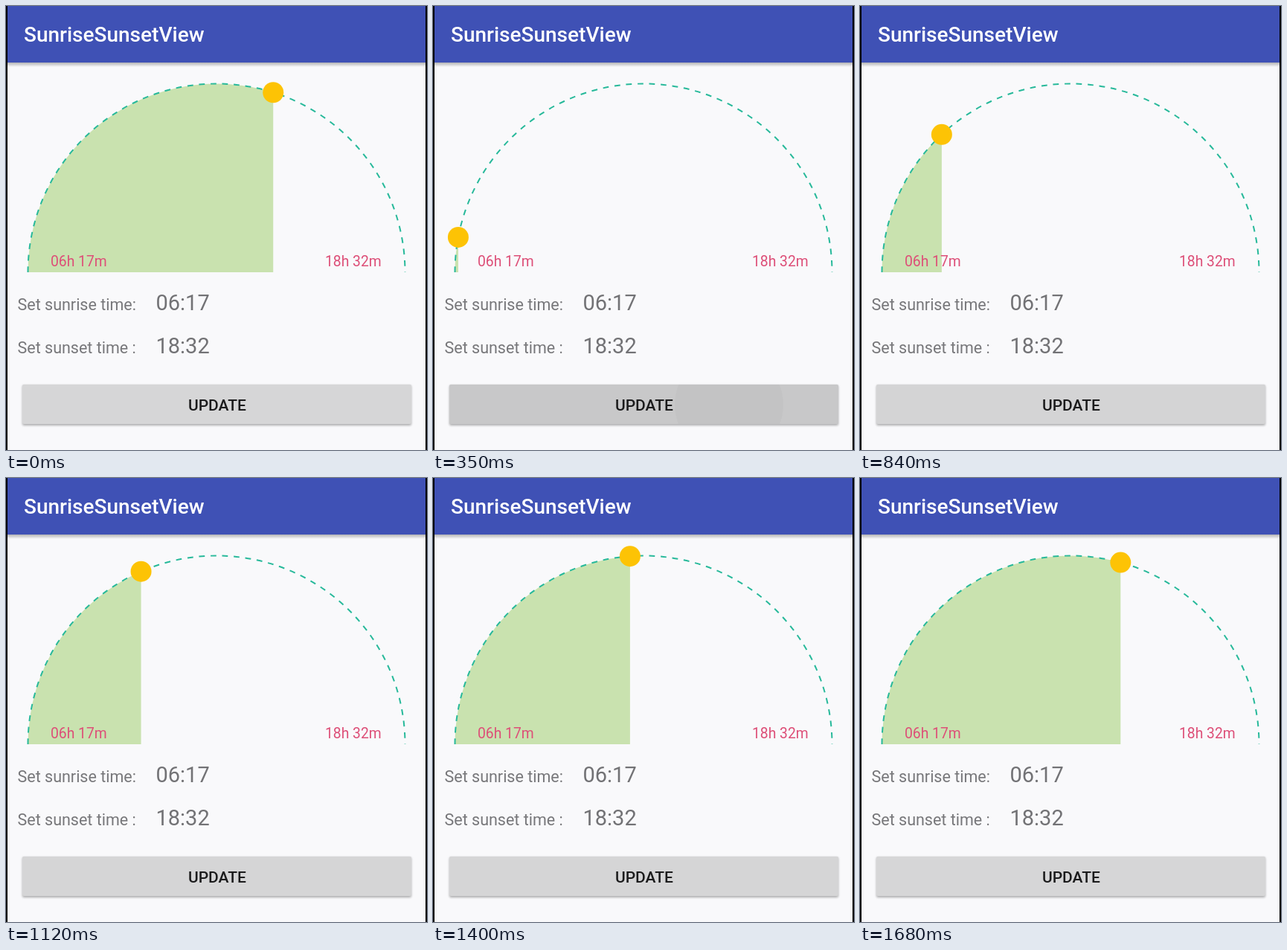
Recreate the animation shown at these times as an HTML page. Size 566 by 597 pixels, loop 1750 ms.

```html
<!DOCTYPE html>
<html lang="en">
<head>
<meta charset="utf-8">
<title>SunriseSunsetView</title>
<style>
  html, body { margin: 0; height: 100%; overflow: hidden; background: #f9f9fb; }
  svg { display: block; width: 566px; height: 597px; font-family: Roboto, sans-serif; }
  .title { font-size: 28px; font-weight: 500; fill: #fff; }
  .hours { font-size: 19.3px; fill: #dd4f78; }
  .label { font-size: 21.5px; fill: #77777a; }
  .value { font-size: 29px; fill: #727275; }
  .action { font-size: 21px; font-weight: 500; fill: #1b1b1c; text-anchor: middle; }
</style>
</head>
<body>
<svg viewBox="0 0 566 597">
  <defs>
    <linearGradient id="fade" x2="0" y2="1">
      <stop stop-opacity=".28"/>
      <stop offset="1" stop-opacity="0"/>
    </linearGradient>
    <clipPath id="face"><rect x="22" y="509" width="523" height="53" rx="2"/></clipPath>
    <filter id="blur" x="-5%" y="-20%" width="110%" height="150%"><feGaussianBlur stdDeviation="1.5"/></filter>
  </defs>
  <rect y="76" width="566" height="6" fill="url(#fade)"/>
  <rect width="566" height="76" fill="#3f51b5"/>
  <text class="title" x="24" y="48">SunriseSunsetView</text>

  <path id="day" fill="#c9e2af"/>
  <path d="M29.5 358A253.5 253.5 0 0 1 536.5 358" fill="none" stroke="#27b99a" stroke-width="2" stroke-dasharray="7.8"/>
  <circle id="sun" r="14" fill="#fdc305"/>
  <text class="hours" x="60" y="350">06h 17m</text>
  <text class="hours" x="429" y="350">18h 32m</text>

  <text class="label" x="15.5" y="409">Set sunrise time:</text>
  <text class="value" x="201.5" y="409">06:17</text>
  <text class="label" x="15.5" y="467">Set sunset time :</text>
  <text class="value" x="201.5" y="467">18:32</text>

  <rect id="shadow" x="22" y="510" width="523" height="54" rx="2" opacity=".3" filter="url(#blur)"/>
  <g clip-path="url(#face)">
    <rect id="button" x="22" y="509" width="523" height="53"/>
    <circle id="ripple" cx="398" cy="536" opacity=".025"/>
  </g>
  <text class="action" x="284" y="544">UPDATE</text>
  <path d="M1 0V597M565 0V597" stroke="#000" stroke-width="2"/>
</svg>
<script>
const LOOP = 1750, STEP = 70, CX = 283, CY = 358, R = 253.5;
const el = id => document.getElementById(id);

// Piecewise linear value through [time, value] points
function track(points, t) {
  const i = Math.max(1, points.findIndex(p => p[0] >= t));
  const [[t0, a], [t1, b]] = points.slice(i - 1, i + 1);
  return a + (b - a) * (t - t0) / (t1 - t0);
}

const SUN = [[210, .4], [350, 10.7], [630, 32.3], [1680, 105.4], [1750, 107.5]];
const GRAY = [[0, 214], [210, 200], [350, 200], [630, 207], [840, 212], [1120, 213], [1750, 214]];

function draw(t) {
  const angle = (t < 210 ? 107.5 : track(SUN, t)) * Math.PI / 180;
  const x = CX - R * Math.cos(angle), y = CY - R * Math.sin(angle);
  el('day').setAttribute('d', `M${CX - R} ${CY}A${R} ${R} 0 0 1 ${x} ${y}V${CY}Z`);
  el('sun').setAttribute('cx', x);
  el('sun').setAttribute('cy', y);

  const gray = track(GRAY, t);
  el('button').setAttribute('fill', `rgb(${gray},${gray},${gray + 1})`);
  el('shadow').setAttribute('y', t > 0 && t < 350 ? 512 : 510);
  el('ripple').setAttribute('r', t < 560 ? Math.min(73, t * .21) : 0);
}

function frame() {
  draw(Math.floor(performance.now() % LOOP / STEP) * STEP);
  requestAnimationFrame(frame);
}
frame();
</script>
</body>
</html>
```
